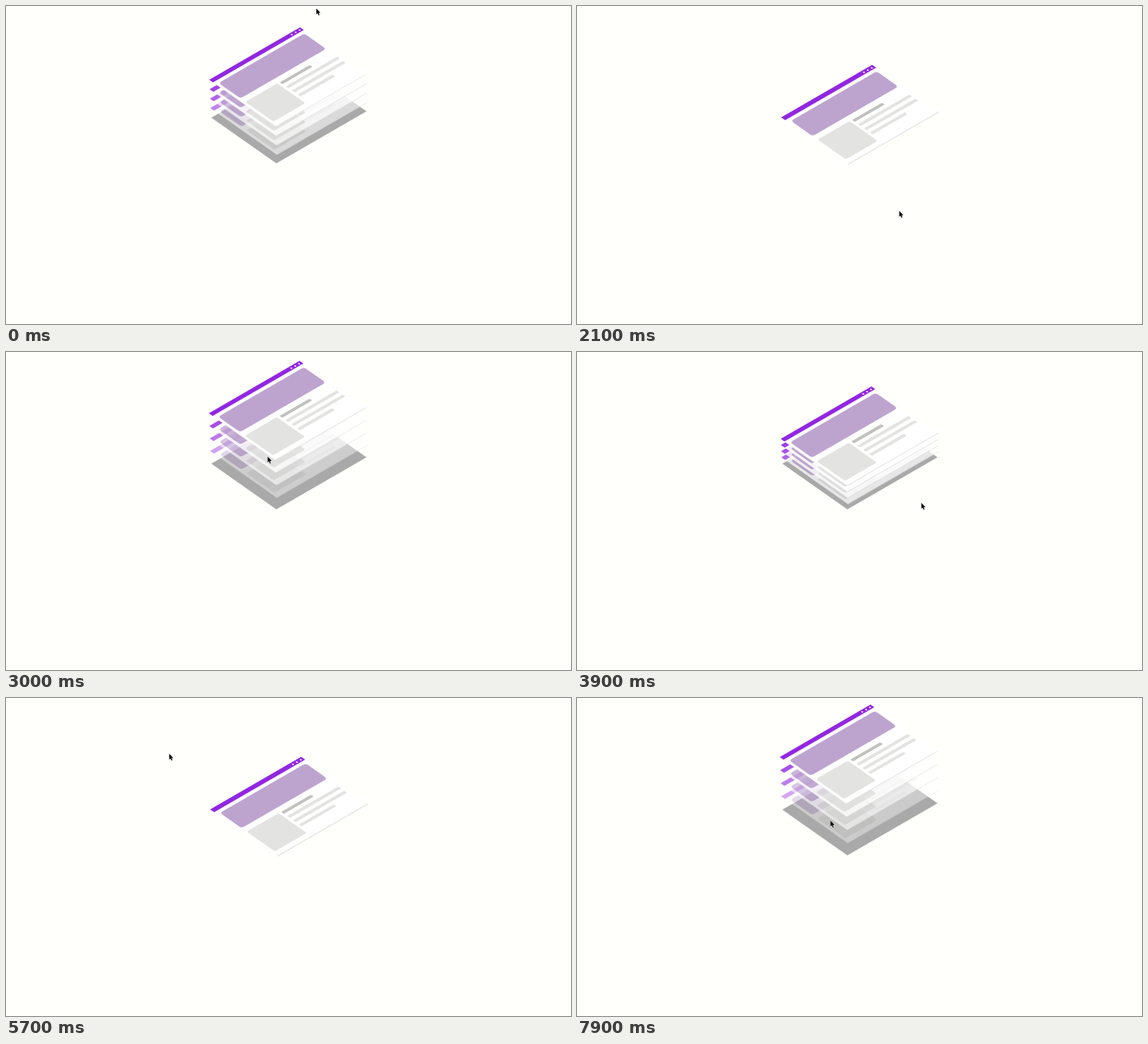
An HTML page with a canvas for the animation above (8 s loop, 690 px wide and 388 px high).

```html
<!DOCTYPE html>
<html lang="en">
<head>
<meta charset="utf-8">
<title>Layered page</title>
<style>
  html, body { margin: 0; width: 100%; height: 100%; overflow: hidden; background: #fffffc; }
  canvas { display: block; }
</style>
</head>
<body>
<canvas id="stage" width="690" height="388"></canvas>
<script>
const W = 690, H = 388, LOOP = 8000, STEP = 100;
const ctx = document.getElementById('stage').getContext('2d');
const sheet = document.createElement('canvas');
sheet.width = W;
sheet.height = H;
const pen = sheet.getContext('2d');

// rotate(-30deg) skewX(25deg), with the page's left corner as origin
const DEG = Math.PI / 180;
const COS = Math.cos(30 * DEG), SIN = Math.sin(30 * DEG), SKEW = Math.tan(25 * DEG);
const ISO = [COS, -SIN, COS * SKEW + SIN, COS - SIN * SKEW, 250.2, 136.3];
const LAYERS = 4, LIFT = 56.5;
const PAGE_W = 128, PAGE_H = 89.6;

// cubic-bezier(.25, .1, .25, 1), solved by bisection
function ease(x) {
  if (x <= 0) return 0;
  if (x >= 1) return 1;
  let lo = 0, hi = 1;
  for (let i = 0; i < 24; i++) {
    const s = (lo + hi) / 2, r = 1 - s;
    if (0.75 * r * s + s * s * s < x) lo = s; else hi = s;
  }
  const r = 1 - lo;
  return 0.3 * r * r * lo + 3 * r * lo * lo + lo * lo * lo;
}

// how far the layers are spread apart, 0 to 1
function spread(t) {
  if (t < 700) return 0.72;
  const move = (start, time) => ease((t - start) / time);
  return move(2412, 800) - move(3683, 700) + move(6420, 800);
}

// pointer moves: arrival time, x, y, travel time; it rests in between
const MOVES = [
  [0, 379, 3], [700, 376, 379], [1000, 376, 400], [1600, 427, 317, 200],
  [2100, 393.5, 250], [2400, 362, 166, 200], [3000, 319.5, 127.5, 600],
  [3900, 420.5, 184, 900], [4300, 464.5, 211, 400], [4400, 485, 217],
  [4600, 497, 216], [4800, 514, 165], [5800, 179, 111, 900],
  [6400, 265, 143, 600], [6700, 303.5, 149, 300], [7200, 337, 118, 500],
  [7500, 329.5, 139], [7700, 321, 145], [7900, 309.5, 149.5]
];

function pointerAt(t) {
  // sweep over the page, right to left
  if (t > 4900 && t < 5800) {
    const a = -0.28 + 3.27 * (t - 4900) / 900;
    return [349 + 172 * Math.cos(a), 130 - 126 * Math.sin(a)];
  }
  let [, x, y] = MOVES[0];
  for (const [end, tx, ty, time = STEP] of MOVES) {
    const k = Math.min(1, Math.max(0, 1 - (end - t) / time));
    x += (tx - x) * k;
    y += (ty - y) * k;
  }
  return [x, y];
}

function box(c, color, x, y, w, h, r = 0) {
  c.fillStyle = color;
  c.beginPath();
  c.roundRect(x, y, w, h, r);
  c.fill();
}

function drawPage(d) {
  pen.setTransform(1, 0, 0, 1, 0, 0);
  pen.clearRect(0, 0, W, H);
  pen.setTransform(...ISO);
  pen.translate(d, -d);
  box(pen, '#fff', 0, 0, PAGE_W, PAGE_H);
  box(pen, '#dededc', 0, PAGE_H - 0.4, PAGE_W, 0.7);
  box(pen, '#9226e2', 0, -0.5, PAGE_W, 5.1);
  for (let i = 0; i < 3; i++) box(pen, '#fff', 112.5 + i * 5.5, 1.2, 2, 2, 1);
  box(pen, '#bda4cf', 3.5, 8.8, 120.8, 29.5, 3.4);
  box(pen, '#e3e3e2', 3.4, 45, 45, 38, 2);
  const line = (color, row, w) => box(pen, color, 51.8, 45.3 + row * 8, w, 3.7, 1.1);
  line('#c1c1be', 0, 42.2);
  line('#e3e3e1', 1, 72.4);
  line('#e3e3e1', 2, 72.4);
  line('#e3e3e1', 3, 49.2);
}

function drawPointer(x, y) {
  ctx.setTransform(0.9, 0, 0, 0.9, x, y);
  ctx.beginPath();
  [[0, 0], [0, 8], [1.8, 6.4], [3, 9.4], [4.4, 8.8], [3.2, 6], [5.6, 5.8]]
    .forEach(p => ctx.lineTo(...p));
  ctx.closePath();
  ctx.lineJoin = 'round';
  ctx.lineWidth = 1;
  ctx.strokeStyle = 'rgba(255,255,255,.8)';
  ctx.stroke();
  ctx.fillStyle = '#0a0a0a';
  ctx.fill();
}

function draw(t) {
  const p = spread(t);
  ctx.setTransform(1, 0, 0, 1, 0, 0);
  ctx.fillStyle = '#fffffc';
  ctx.fillRect(0, 0, W, H);
  ctx.setTransform(...ISO);
  box(ctx, '#a9a9a9', 0.3, 0.3, PAGE_W - 0.9, PAGE_H - 1.7);
  ctx.setTransform(1, 0, 0, 1, 0, 0);
  for (let i = 1; i <= LAYERS; i++) {
    drawPage(LIFT * p * i / LAYERS);
    ctx.globalAlpha = 1 - p * (LAYERS - i) * 0.2;
    ctx.drawImage(sheet, 0, 0);
  }
  ctx.globalAlpha = 1;
  drawPointer(...pointerAt(t));
}

const begin = performance.now();
function tick() {
  const t = (performance.now() - begin) % LOOP;
  draw(Math.floor(t / STEP) * STEP);
  requestAnimationFrame(tick);
}
tick();
</script>
</body>
</html>
```
